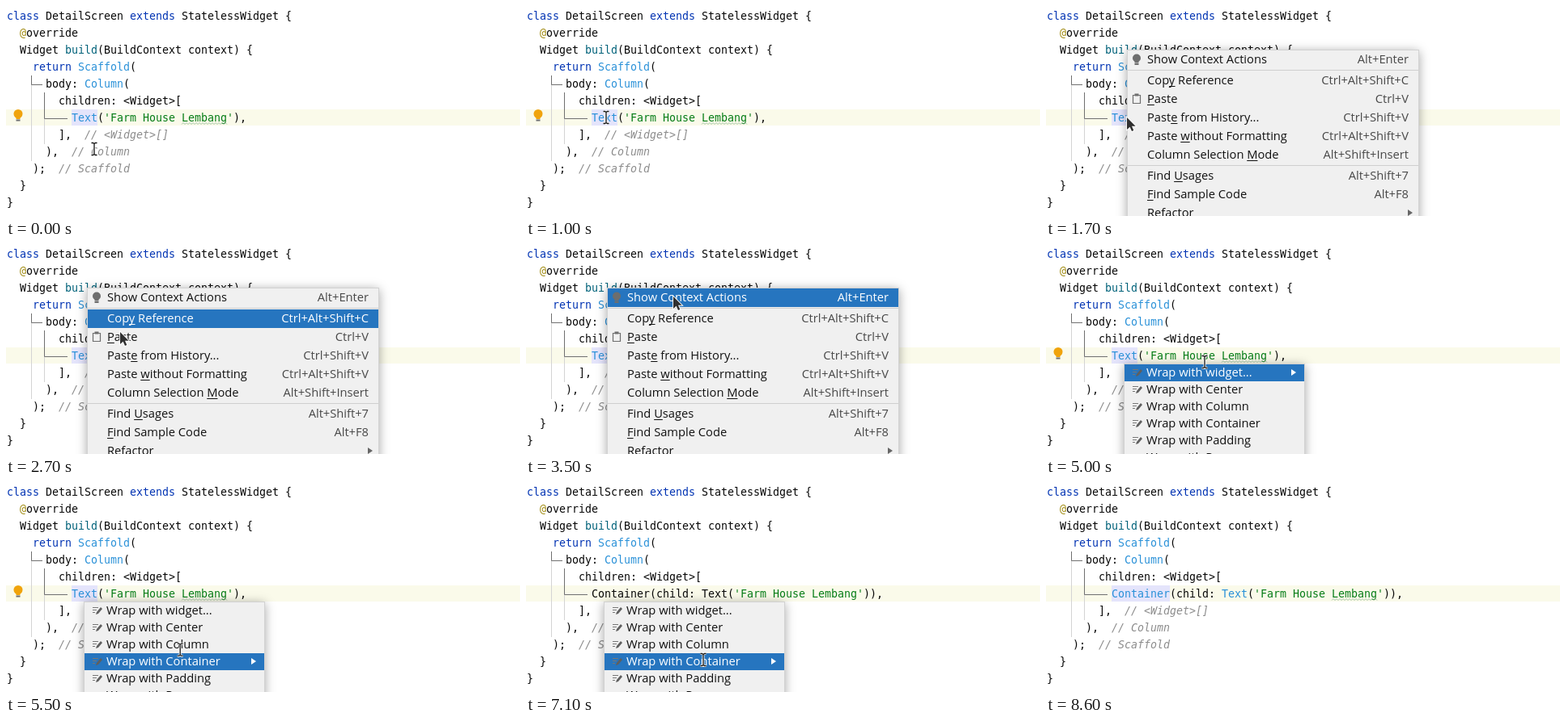
An HTML page with a canvas that plays this animation: 635x260 px, repeating every 9.3 s.

```html
<!DOCTYPE html>
<html lang="en">
<head>
<meta charset="utf-8">
<style>
html, body { margin: 0; width: 100%; height: 100%; overflow: hidden; background: #fff; }
canvas { display: block; }
</style>
</head>
<body>
<canvas width="635" height="260"></canvas>
<script>
const LOOP = 9300, STEP = 100, W = 635, H = 260;
const ctx = document.querySelector('canvas').getContext('2d');
const CODE_FONT = '13.29px "DejaVu Sans Mono", monospace';
const MENU_FONT = '500 14.7px "Open Sans", sans-serif';
const BLUE = '#2675bf', INK = '#080808';

const code = [
  'class DetailScreen extends StatelessWidget {',
  '  @override',
  '  Widget build(BuildContext context) {',
  '    return Scaffold(',
  '      body: Column(',
  '        children: <Widget>[',
  '',
  '        ],  // <Widget>[]',
  '      ),  // Column',
  '    );  // Scaffold',
  '  }',
  '}'
];
const TEXT_LINE = "          Text('Farm House Lembang'),";
const WRAPPED_LINE = "          Container(child: Text('Farm House Lembang')),";

const tokens = /(\/\/.*)|('.*?')|\b(class|extends|return)\b|(@)|\b(build)\b|\b(Scaffold|Column|Container|Text)\b/g;
const tokenColors = ['#8c8c8c', '#067d17', '#0033b3', '#9e880d', '#00627a', '#2a91d8'];

// & marks the mnemonic letter
const contextMenu = [
  ['Show Context Actions', 'Alt+Enter'],
  ['Cop&y Reference', 'Ctrl+Alt+Shift+C'],
  ['&Paste', 'Ctrl+V'],
  ['Past&e from History...', 'Ctrl+Shift+V'],
  ['Paste &without Formatting', 'Ctrl+Alt+Shift+V'],
  ['Column Selection &Mode', 'Alt+Shift+Insert'],
  ['Find &Usages', 'Alt+Shift+7'],
  ['&Find Sample Code', 'Alt+F8'],
  ['&Refactor', '']
];
const wrapMenu = ['widget...', 'Center', 'Column', 'Container', 'Padding', 'Row'];

// pointer glides: begin, end, x, y
const glides = [
  [500, 1000, 99, 138],
  [2400, 2700, 140, 109],
  [2700, 3200, 184, 69],
  [3400, 3500, 181, 65],
  [4600, 4800, 199, 135],
  [4900, 5000, 196, 146],
  [5000, 5600, 219, 220],
  [8000, 8600, 55, -30]
];

const clamp = (v, lo = 0, hi = 1) => Math.min(hi, Math.max(lo, v));

function pointerAt(t) {
  let x = 109, y = 177;
  for (const [begin, end, toX, toY] of glides) {
    const p = clamp((t - begin) / (end - begin));
    x += (toX - x) * p;
    y += (toY - y) * p;
  }
  return [x, y];
}

function rect(color, x, y, w, h) {
  ctx.fillStyle = color;
  ctx.fillRect(x, y, w, h);
}

function shape(x, y, d, fill, stroke, width = 1) {
  const path = new Path2D(d);
  ctx.save();
  ctx.translate(x, y);
  if (stroke) {
    ctx.strokeStyle = stroke;
    ctx.lineWidth = width;
    ctx.stroke(path);
  }
  if (fill) {
    ctx.fillStyle = fill;
    ctx.fill(path);
  }
  ctx.restore();
}

function text(s, x, y, color, align = 'left') {
  ctx.fillStyle = color;
  ctx.textAlign = align;
  ctx.fillText(s, x, y);
}

function codeLine(line, row, styled) {
  const put = (s, col, color, style = '') => {
    ctx.font = style + CODE_FONT;
    text(s, 1 + col * 8, 17 + row * 21, color);
  };
  let col = 0;
  for (const m of line.matchAll(tokens)) {
    const kind = m.slice(1).findIndex(Boolean);
    put(line.slice(col, m.index), col, INK);
    put(m[0], m.index, kind === 5 && !styled ? INK : tokenColors[kind], kind ? '' : 'italic ');
    col = m.index + m[0].length;
  }
  put(line.slice(col), col, INK);
}

function bulb(x, y, color, r) {
  ctx.fillStyle = color;
  ctx.beginPath();
  ctx.arc(x, y, r, 0, 7);
  ctx.fill();
  rect(color, x - 2.5, y + r - 2, 5, 3);
  rect('#6e6e6e', x - 2.5, y + r + 1.5, 5, 2);
}

function editor(t) {
  const wrapped = t >= 7100, styled = !wrapped || t >= 7700;
  rect('#fff', 0, 0, W, H);
  rect('#fafaea', 0, 128, W, 20);
  if (!wrapped) rect('#e4e4fb', 81, 128, 32, 20);
  if (t >= 7900) rect('#e4e4fb', 81, 128, 72, 20);
  shape(0, 0, 'M31.5 97V192M47.5 139V171', null, '#d4d4d4');
  shape(0, 0, 'M31.5 86V97.5H45M47.5 107V139.5H76', null, '#707070');
  code.forEach((line, row) => codeLine(line, row, true));
  codeLine(wrapped ? WRAPPED_LINE : TEXT_LINE, 6, styled);
  if (styled) shape(wrapped ? 353 : 217, 146.5, 'M0 0' + 'l2-2 2 2'.repeat(14), null, '#8fb793', .8);
  if (t < 1500 || t >= 4200 && !wrapped) bulb(15, 133.5, '#f0a30c', 5.5);
}

function panel(x, y, w) {
  ctx.save();
  ctx.shadowColor = 'rgba(0,0,0,.35)';
  ctx.shadowBlur = 12;
  ctx.shadowOffsetY = 2;
  rect('#d2d2d2', x, y, w, H);
  ctx.restore();
  rect('#f0f0f0', x + 1, y + 1, w - 2, H);
  ctx.font = MENU_FONT;
}

// groups are set apart by 3 extra pixels
const contextRowY = i => 66 + i * 23 + 3 * (i > 0) + 3 * (i > 5);

function drawContextMenu(t, hoverY) {
  panel(100, 54, 361);
  rect('#cfcfcf', 101, 79, 359, 1);
  rect('#cfcfcf', 101, 197, 359, 1);
  contextMenu.forEach(([label, keys], i) => {
    const y = contextRowY(i), on = t >= 2500 && Math.abs(hoverY - y) < 12;
    const color = on ? '#fff' : '#111';
    const mark = label.indexOf('&'), plain = label.replace('&', '');
    if (on) rect(BLUE, 101, y - 11, 359, 23);
    text(plain, 125, y + 5, color);
    text(keys, 448, y + 5, on ? '#fff' : '#484848', 'right');
    if (mark >= 0) {
      const x = ctx.measureText(plain.slice(0, mark)).width;
      rect(color, 125 + x, y + 7, ctx.measureText(plain[mark]).width, 1);
    }
  });
  bulb(112, 64.5, '#6e6e6e', 5);
  shape(107, 110, 'M.5.5H9.5V10.5H.5Z', null, '#6e6e6e', 1.2);
  rect('#6e6e6e', 109.5, 108.5, 5, 3);
  shape(447, 252, 'M0 0l6 4-6 4z', '#666');
}

function drawWrapMenu(t, hoverY) {
  const selected = clamp(Math.floor((hoverY - 149) / 21), 0, 3);
  panel(96, 148, 224);
  wrapMenu.forEach((name, i) => {
    const y = 159 + i * 21, on = i === selected;
    if (on) {
      rect(BLUE, 97, y - 10, 222, 21);
      shape(303, y - 4, 'M0 0l6 4-6 4z', '#fff');
    }
    text('Wrap with ' + name, 124, y + 5, on ? '#fff' : '#111');
    shape(107, y - 4, 'M0 .5H7M0 3.5H5M0 6.5H3', null, '#777');
    shape(107, y - 4, 'M4 9l1-3 5-6 2 2-5 6z', '#5f5f5f');
  });
}

function drawPointer(t) {
  const [x, y] = pointerAt(t);
  if (t >= 1500 && t < 4200) {
    shape(x + 1, y, 'M0 0V15L3.6 11.8 6 17 8.3 16 6 10.8H10.6Z', '#303030', '#fff', 1.8);
  } else {
    const beam = 'M-3.5-7.5H-1.5L0-6.5 1.5-7.5H3.5M0-6.5V6.5M-3.5 7.5H-1.5L0 6.5 1.5 7.5H3.5';
    shape(x, y, beam, null, '#fff', 3);
    shape(x, y, beam, null, '#111', 1.3);
  }
}

function fade(alpha, draw, t) {
  if (alpha <= 0) return;
  ctx.globalAlpha = Math.min(1, alpha);
  // the highlight runs one step ahead of the drawn pointer
  draw(t, pointerAt(t + STEP)[1]);
  ctx.globalAlpha = 1;
}

function frame(now) {
  const t = Math.floor(now % LOOP / STEP) * STEP;
  editor(t);
  fade(Math.min((t - 1400) / 300, (4200 - t) / 200), drawContextMenu, t);
  fade(Math.min((t - 4300) / 100, (7300 - t) / 200), drawWrapMenu, t);
  drawPointer(t);
}

const start = performance.now();
function tick() {
  frame(performance.now() - start);
  requestAnimationFrame(tick);
}
tick();
</script>
</body>
</html>
```
